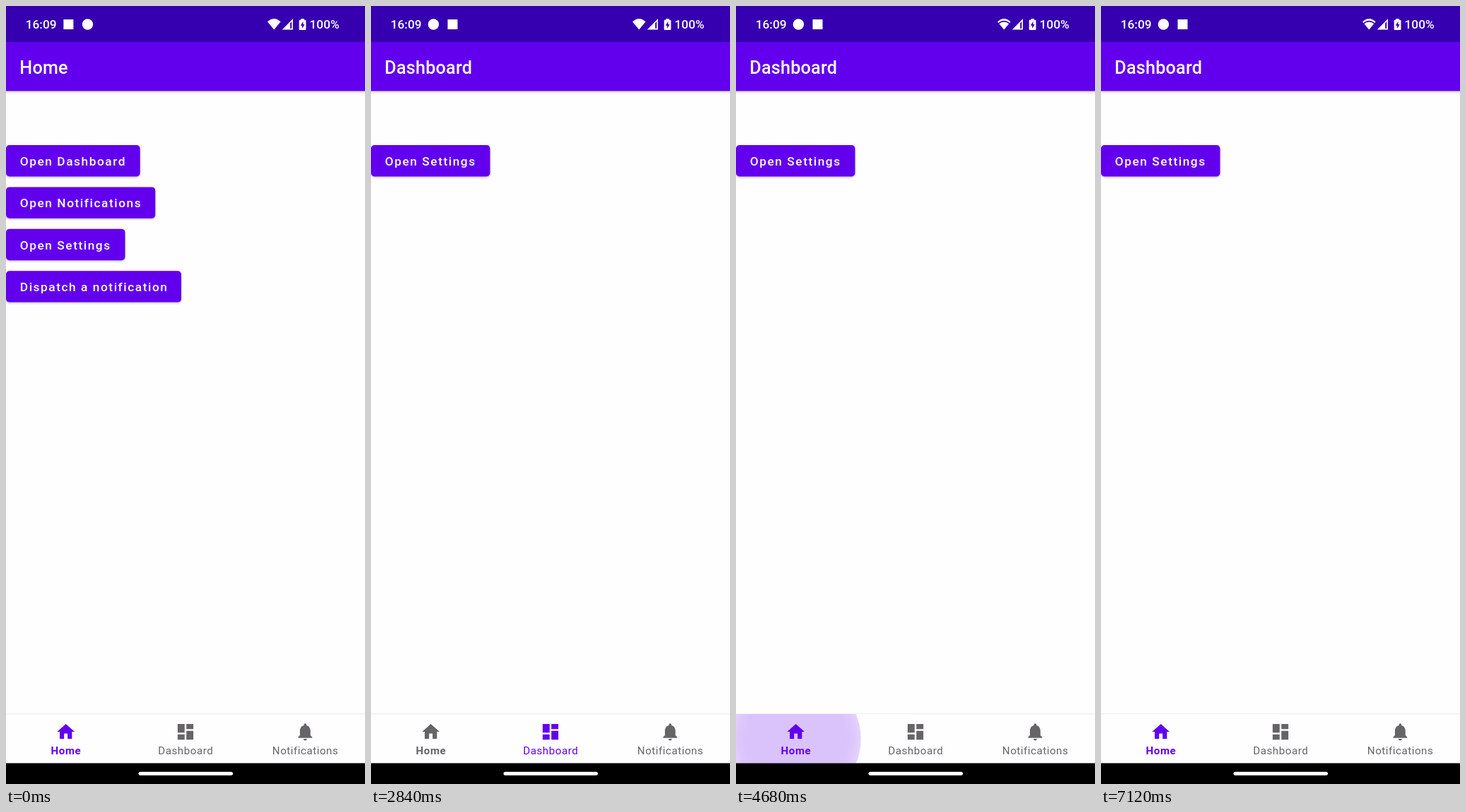
Recreate the animation shown at these times as an HTML page. Size 508x1102 px, loop 9160 ms.

```html
<!DOCTYPE html>
<html lang="en">
<head>
<meta charset="utf-8">
<title>Bottom navigation</title>
<style>
  html, body { margin: 0; width: 100%; height: 100%; overflow: hidden; background: #fefdff; }
  svg { display: block; width: 100%; height: 100%; }
  text { font-family: Roboto, "Noto Sans", sans-serif; }
  .status { font-size: 17.3px; font-weight: 500; fill: #fff; }
  .title { font-size: 25.2px; font-weight: 500; letter-spacing: .2px; fill: #fff; }
  .button text { font-size: 17.3px; font-weight: 500; letter-spacing: 1.54px; fill: #fff; }
  .tab text { font-size: 15.1px; letter-spacing: .55px; text-anchor: middle; }
  .tab .bold { font-weight: 700; }
</style>
</head>
<body>
<svg id="stage" viewBox="0 0 508 1102" preserveAspectRatio="none">
  <defs>
    <linearGradient id="shade" x2="0" y2="1">
      <stop offset="0" stop-color="#000" stop-opacity=".13"/>
      <stop offset="1" stop-color="#000" stop-opacity="0"/>
    </linearGradient>
    <radialGradient id="glow" gradientUnits="userSpaceOnUse" cx="84.7" cy="1038" r="10"></radialGradient>
    <clipPath id="navClip"><rect y="1003" width="508" height="69.5"/></clipPath>
    <filter id="lift" x="-10%" y="-20%" width="120%" height="150%">
      <feDropShadow dx="0" dy="1.5" stdDeviation="1.3" flood-color="#000" flood-opacity=".24"/>
    </filter>
  </defs>
  <rect width="508" height="1102" fill="#fefdff"/>
  <g id="homePage"></g>
  <g id="dashPage"></g>

  <rect y="120.5" width="508" height="5" fill="url(#shade)"/>
  <rect y="50" width="508" height="70.5" fill="#6200ee"/>
  <rect width="508" height="51" fill="#3600b1"/>
  <text id="title" class="title" x="19.3" y="95.5"></text>

  <text class="status" x="27.7" y="32">16:09</text>
  <rect id="square" y="19" width="14" height="14" fill="#fff"/>
  <circle id="dot" cy="26" r="7.7" fill="#fff"/>
  <path d="M379.3 33.5 370 22.3Q379.3 13.6 388.6 22.3Z" fill="#fff"/>
  <path id="weak" d="M371 25.2Q379.3 18 387.6 25.2" fill="none" stroke="#3600b1" stroke-width="1.5"/>
  <path d="M390.8 33.5H406V18ZM402.2 24.2V31.8H404.3V22Z" fill="#fff" fill-rule="evenodd"/>
  <path d="M417.3 18h4.6v1.7h1.6q1 0 1 1v12.2q0 1-1 1h-7.8q-1 0-1-1V20.700q0-1 1-1h1.600z" fill="#fff"/>
  <path d="M420.400 21.800 416.800 27.800H419.100V32L422.600 25.900H420.400Z" fill="#3600b1"/>
  <text class="status" x="429.5" y="32">100%</text>

  <rect y="1002" width="508" height="1.2" fill="#f1eff2"/>
  <g clip-path="url(#navClip)">
    <circle id="ripple" cx="84.7" cy="1038" r="92" fill="url(#glow)"/>
  </g>
  <g id="tabs"></g>
  <rect y="1072.5" width="508" height="29.5"/>
  <rect x="187.500" y="1084.700" width="133.500" height="5" rx="2.500" fill="#fff"/>
</svg>
<script>
const LOOP = 9160, ICON_SWAP = 2200, OPEN_DASH = 2840, WIFI_DROP = 4000;
const PRESS = 4280, RELEASE = 4400, RIPPLE_OUT = 4700, RIPPLE_END = 5080;
const PURPLE = "#6200ee", GREY = "#666466";
const NS = "http://www.w3.org/2000/svg";
const $ = id => document.getElementById(id);
const clamp = v => Math.max(0, Math.min(1, v));
const span = (t, from, to) => clamp((t - from) / (to - from));

function add(parent, tag, attrs, text = "") {
  const el = document.createElementNS(NS, tag);
  for (const key in attrs) el.setAttribute(key, attrs[key]);
  el.textContent = text;
  return parent.appendChild(el);
}

function addButton(page, row, width, label) {
  const y = 197 + row * 59.4;
  const g = add(page, "g", { class: "button" });
  add(g, "rect", { y, width, height: 44.4, rx: 5, fill: PURPLE, filter: "url(#lift)" });
  add(g, "text", { x: 19.8, y: y + 29 }, label);
}

[["Open Dashboard", 189.7], ["Open Notifications", 211.3], ["Open Settings", 168.5], ["Dispatch a notification", 248]]
  .forEach(([label, width], row) => addButton($("homePage"), row, width, label));
addButton($("dashPage"), 0, 168.5, "Open Settings");

const tabs = [
  ["Home", "M10 20v-6h4v6h5v-8h3L12 3 2 12h3v8z"],
  ["Dashboard", "M3 13h8V3H3zM3 21h8v-6H3zM13 21h8V11h-8zM13 3v6h8V3z"],
  ["Notifications", "M12 22c1.1 0 2-.9 2-2h-4c0 1.1.9 2 2 2zM18 16v-5c0-3.070-1.640-5.640-4.500-6.320V4a1.500 1.500 0 0 0-3 0v.68C7.630 5.360 6 7.920 6 11v5l-2 2v1h16v-1z"]
].map(([label, d], i) => {
  const x = 508 * (i + .5) / 3;
  const g = add($("tabs"), "g", { class: "tab" });
  add(g, "path", { d, transform: `translate(${x - 14.83} 1013.2) scale(1.236)` });
  const at = { x: x + .27, y: 1060 };
  return {
    g,
    plain: add(g, "text", at, label),
    bold: add(g, "text", { ...at, class: "bold" }, label)
  };
});

// Soft edge of the ripple, sampled from a smoothstep
const EDGE_IN = .7, EDGE_OUT = 1.3, STOPS = 6;
for (let i = 0; i <= STOPS; i++) {
  const k = i / STOPS;
  add($("glow"), "stop", {
    offset: (EDGE_IN + (EDGE_OUT - EDGE_IN) * k) / EDGE_OUT,
    "stop-color": PURPLE,
    "stop-opacity": 1 - k * k * (3 - 2 * k)
  });
}

function drawTab(tab, active, weight) {
  tab.g.setAttribute("fill", active ? PURPLE : GREY);
  tab.bold.setAttribute("opacity", weight);
  tab.plain.setAttribute("opacity", 1 - weight);
}

function drawRipple(t) {
  const grow = 1 - (1 - span(t, PRESS, PRESS + 450)) ** 2;
  const alpha = (.27 - .04 * grow) * span(t, PRESS - 20, PRESS + 60) * (1 - span(t, RIPPLE_OUT, RIPPLE_END));
  $("glow").setAttribute("r", (18 + 84 * grow) * EDGE_OUT);
  $("ripple").setAttribute("opacity", t < PRESS ? 0 : alpha);
}

function render(t) {
  const dash = t >= OPEN_DASH;
  const swapped = t >= ICON_SWAP;
  $("homePage").style.display = dash ? "none" : "";
  $("dashPage").style.display = dash ? "" : "none";
  $("title").textContent = dash ? "Dashboard" : "Home";
  $("square").setAttribute("x", (swapped ? 115.5 : 88.4) - 7);
  $("dot").setAttribute("cx", swapped ? 88.4 : 115.5);
  $("weak").style.display = t >= WIFI_DROP ? "" : "none";

  const dashTab = dash && t < RELEASE;
  const dashWeight = span(t, OPEN_DASH + 30, OPEN_DASH + 150) - span(t, RELEASE + 30, RELEASE + 150);
  drawTab(tabs[0], !dashTab, 1 - dashWeight);
  drawTab(tabs[1], dashTab, dashWeight);
  drawTab(tabs[2], false, 0);
  drawRipple(t);
}

const start = performance.now();
function tick() {
  render((performance.now() - start) % LOOP);
  requestAnimationFrame(tick);
}
tick();
</script>
</body>
</html>
```
